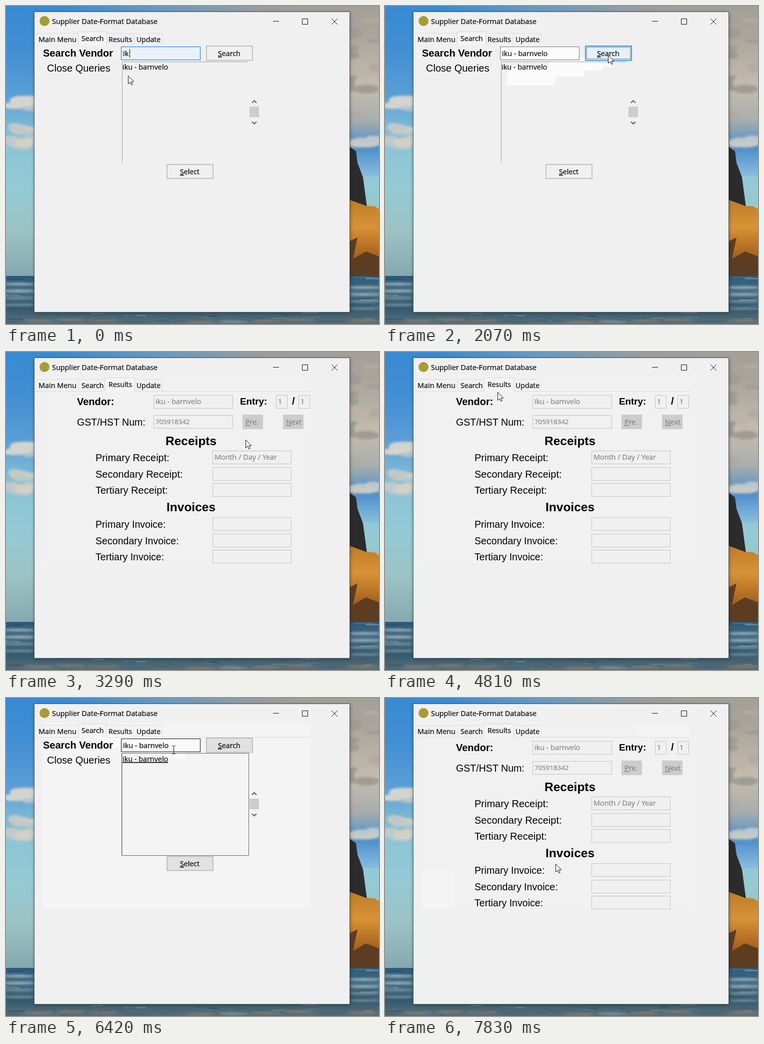
Recreate the animation shown at these times as an HTML page. Size 746 px wide and 635 px high, loop 8000 ms.

```html
<!DOCTYPE html>
<html lang="en">
<head>
<meta charset="utf-8">
<title>Supplier Date-Format Database</title>
<style>
  html, body { margin: 0; width: 100%; height: 100%; overflow: hidden; }
  svg { display: block; width: 746px; height: 635px; }
  text { white-space: pre; }
  .ui { font-family: "Open Sans", "Noto Sans", sans-serif; font-size: 14.4px; fill: #000; stroke: #000; stroke-width: .2px; }
  .dim { fill: #808080; stroke: #808080; }
  .chosen { fill: #fff; stroke: none; }
  .label { font-family: "Liberation Sans", Arial, sans-serif; font-size: 20px; fill: #000; }
  .bold { font-weight: bold; }
</style>
</head>
<body>
<svg id="stage" viewBox="0 0 746 635" xmlns="http://www.w3.org/2000/svg"></svg>
<script>
const LOOP = 8000;
const VENDOR = "iku - barnvelo";
const BLUE = "#0078d7";
const stage = document.getElementById("stage");

const rect = (x, y, w, h, fill, extra = "") =>
  `<rect x="${x}" y="${y}" width="${w}" height="${h}" fill="${fill}" ${extra}/>`;
// A crisp one pixel border, given by its outer edges.
const box = (x, y, right, bottom, fill, stroke, extra = "") =>
  rect(x + .5, y + .5, right - x - 1, bottom - y - 1, fill, `stroke="${stroke}" ${extra}`);
const path = (d, stroke, extra = "") => `<path d="${d}" fill="none" stroke="${stroke}" ${extra}/>`;
const text = (x, y, s, cls = "ui", extra = "") => `<text x="${x}" y="${y}" class="${cls}" ${extra}>${s}</text>`;
const sized = px => `style="font-size:${px}px"`;
const keyed = s => `<tspan text-decoration="underline">${s[0]}</tspan>${s.slice(1)}`;
const group = (id, content) => `<g id="${id}">${content}</g>`;
const poly = (points, fill) => `<polygon points="${points}" fill="${fill}"/>`;
const ellipse = (x, y, rx, ry, fill) => `<ellipse cx="${x}" cy="${y}" rx="${rx}" ry="${ry}" fill="${fill}"/>`;
const repeat = (count, make) => Array.from({ length: count }, (_, i) => make(i)).join("");

function makeRandom(seed) {
  return () => (seed = (seed * 16807) % 2147483647) / 2147483647;
}

function gradient(id, colors, across = false) {
  const stops = colors.map((color, i) => `<stop offset="${i / (colors.length - 1)}" stop-color="${color}"/>`);
  return `<linearGradient id="${id}" ${across ? "" : 'x2="0" y2="1"'}>${stops.join("")}</linearGradient>`;
}

function scenery() {
  const random = makeRandom(41);
  const pick = list => list[Math.floor(random() * list.length)];
  const clouds = (count, left, width, top, height, colors) => repeat(count, () =>
    ellipse(left + random() * width, top + random() * height, 10 + random() * 16, 4 + random() * 7, pick(colors)));
  const waves = repeat(110, () =>
    rect(random() * 746 - 15, 541 + random() * 92, 8 + random() * 34, 1 + random() * 2,
      pick(["#244d68", "#4b7890", "#2c5a78", "#8b9da4"]), 'opacity=".65"'));
  return `<defs>
      ${gradient("sky", ["#378ad3", "#438fd3", "#5c9fd6", "#8cc4d5", "#94cad5", "#9cc3c4", "#86a9b0"])}
      ${gradient("haze", ["#a5a097", "#aaa59b", "#b9b2a5", "#c1baad", "#a9aeae", "#4c8fca", "#8bbce0"])}
      ${gradient("top", ["#378ad3", "#6a9ac0", "#9c9e9c", "#a5a097"], true)}
      ${gradient("sea", ["#2b5979", "#476f86", "#31596f", "#5d6e75"])}
      ${gradient("cliff", ["#bf7d27", "#d99236", "#a9651f", "#5b3b1f"])}
      <filter id="soft" x="-50%" y="-50%" width="200%" height="200%"><feGaussianBlur stdDeviation="2"/></filter>
      <filter id="shade" x="-10%" y="-10%" width="120%" height="120%"><feGaussianBlur stdDeviation="3"/></filter>
    </defs>
    ${rect(0, 0, 746, 540, "url(#sky)")}
    ${rect(100, 0, 646, 12, "url(#top)")}
    ${rect(687, 0, 59, 340, "url(#haze)")}
    <g filter="url(#soft)">
      ${clouds(9, 0, 57, 184, 22, ["#c5ccd0", "#b0c3d0", "#d4d4cf"])}
      ${clouds(12, 0, 57, 238, 40, ["#d3d0c5", "#bccad0", "#c7c7c0"])}
      ${clouds(16, 687, 59, 10, 220, ["#a09c95", "#c2baab", "#b0aaa0"])}
      ${clouds(5, 700, 46, 262, 16, ["#b9c7cf", "#cacac5"])}
    </g>
    ${poly("687,281 700,290 703,313 714,342 722,402 687,405", "#2c2c2d")}
    ${poly("687,387 720,399 737,400 746,406 746,550 687,550", "url(#cliff)")}
    ${poly("687,470 703,462 694,505 720,490 746,500 746,550 687,550", "#5d3d22")}
    ${rect(0, 539, 746, 96, "url(#sea)")}
    ${waves}
    <g filter="url(#soft)">
      ${repeat(8, i => ellipse(i % 2 ? 718 : 26, 555 + i * 7, 32, 2, i < 4 ? "#b6c2c6" : "#8798a0"))}
      ${repeat(12, i => ellipse(i * 65, 626 + random() * 6, 30, 2, pick(["#8a7f70", "#40627a", "#8c989d"])))}
    </g>`;
}

function frame() {
  return rect(56, 13, 633, 600, "#000", 'opacity=".3" filter="url(#shade)"') +
    box(56, 11, 688, 612, "#f0f0f0", "#4c5358") +
    ellipse(77, 30, 10, 10, "#a79c36") +
    text(92, 36, "Supplier Date-Format Database") +
    path("M534 30.5h12M592.5 25.5h11v11h-11zM651 25l12 12m0-12l-12 12", "#111");
}

function tabs(active) {
  const names = ["Main Menu", "Search", "Results", "Update"];
  const starts = [65, 151, 205, 261];
  const [left, right] = active === 1 ? [144, 202] : [197, 258];
  const edges = starts.slice(1).map(x => x - 6).concat(312).filter(x => x < left - 2 || x > right + 2);
  return path("M59 54.5H312.5" + edges.map(x => `M${x + .5} 54v24`).join(""), "#dcdcdc") +
    rect(left, 51, right - left, 28, "#f4f4f4") +
    path(`M${left + .5} 78V51.5H${right - .5}V78`, "#d4d4d4") +
    names.map((name, i) => text(starts[i], i === active ? 70 : 72, name, "ui", sized(i ? 14.1 : 14.4))).join("");
}

// Areas that react to the pointer: x, y, width, height.
const AREAS = {
  field: [230, 81, 159, 27],
  searchButton: [401, 80, 92, 28.5],
  selectButton: [322, 316.5, 92, 28],
  vendor: [295, 86, 159, 27],
  number: [295, 126, 159, 28],
  tabHover: [146, 55, 51, 23]
};

function button(id, label, labelX) {
  const [x, y, w, h] = AREAS[id];
  return rect(x, y, w, h, "none", `id="${id}" stroke-width="1.5"`) +
    text(labelX, Math.floor(y) + 20, keyed(label), "ui", sized(14.2));
}

function searchView() {
  return group("panel", rect(74, 50, 535, 371, "#f4f4f4")) +
    group("trails", "") +
    group("openList", path("M232.5 313V111.5H483", "#a0a0a0")) +
    group("fullList", path("M58 78.5H609", "#d9d9d9") +
      box(231, 110, 486, 315, "none", "#696969") + path("M232.5 313V112", "#b5b5b5")) +
    tabs(1) +
    text(74, 101, "Search Vendor", "label bold") +
    text(82, 131, "Close Queries", "label") +
    box(230, 81, 389, 108, "#fcfcfc", "#7a7a7a", 'id="field"') +
    text(234, 100, "", "ui", 'id="query"') +
    rect(247, 86, 1, 17, "#000", 'id="caret"') +
    button("searchButton", "Search", 424) +
    box(403, 82, 491, 106, "none", "#222", 'id="focus" stroke-dasharray="1 1"') +
    group("selection", rect(233, 112, 251, 28, "#fbfbfb") + rect(233, 113, 251, 19, BLUE)) +
    text(233, 127, VENDOR, "ui", 'id="item"') +
    rect(487, 201, 19, 21, "#cdcdcd") +
    path("M492 193.5l4.5-4.5 4.5 4.5M492 231l4.5 4.5 4.5-4.5", "#606060", 'stroke-width="2"') +
    button("selectButton", "Select", 348);
}

function resultsView() {
  const input = (x, y, w, value = "", px = 14.4) =>
    box(x, y, x + w, y + 27, "#f0f0f0", "#c3c3c3") + text(x + 4, y + 18, value, "ui dim", sized(px));
  const disabled = (x, label) =>
    rect(x, 125, 41, 29, "#cccccc") + text(x + 6, 145, keyed(label), "ui dim");
  const rows = (kind, top, px, first) => ["Primary", "Secondary", "Tertiary"].map((rank, i) => {
    const y = Math.round(top + i * 32.5);
    return text(179, y + 21, `${rank} ${kind}:`, "label", sized(px)) + input(413, y, 158, i ? "" : first);
  }).join("");
  return rect(74, 50, 535, 371, "#f1f1f1") +
    group("patches", rect(506, 51, 103, 27, "#f4f4f4") + rect(74, 345, 66, 76, "#f4f4f4")) +
    path("M58 78.5H609", "#dcdcdc") +
    rect(...AREAS.tabHover, "#d8eaf9", 'id="tabHover"') + tabs(2) +
    text(142, 106, "Vendor:", "label bold") + input(295, 86, 159, VENDOR) +
    text(468, 105, "Entry:", "label bold", sized(18.8)) +
    input(540, 86, 23, "1") + text(572, 105, "/", "label bold") + input(585, 86, 23, "1") +
    text(142, 147, "GST/HST Num:", "label", sized(19.6)) + input(295, 126, 159, "705918342", 13.3) +
    disabled(473, "Pre.") + disabled(554, "Next") +
    text(319, 186, "Receipts", "label bold", sized(24.5)) + rows("Receipt", 197, 20, "Month / Day / Year") +
    text(321, 318, "Invoices", "label bold", sized(24.5)) + rows("Invoice", 330, 19.6, "");
}

const pointers =
  group("arrow", `<path d="M.5 .5V16.5L4.2 13L6.8 18.6L9.2 17.5L6.7 12.1H11.8Z" fill="#fff" stroke="#111"/>`) +
  group("beam", path("M-3 -7.5h2.5l1 1 1-1H4M.5 -6.5v15M-3 8.5h2.5l1-1 1 1H4", "#111"));

stage.innerHTML = scenery() + frame() +
  group("search", searchView()) + group("results", resultsView()) + pointers;

const el = id => document.getElementById(id);
const show = (id, on) => el(id).setAttribute("visibility", on ? "inherit" : "hidden");
const set = (id, attrs) => { for (const k in attrs) el(id).setAttribute(k, attrs[k]); };

// Each glide of the pointer: start time, number of screen updates, destination.
const STEP = 122;
const GLIDES = [
  [1580, 5, 446, 98], [2900, 4, 479, 175], [3870, 3, 373, 131], [4570, 4, 191, 68], [5090, 3, 182, 68],
  [5480, 6, 346, 99], [6420, 1, 335, 103], [6570, 2, 303, 121], [7120, 1, 319, 284], [7280, 3, 341, 331]
];

function pointerHops() {
  let from = { time: 0, x: 244, y: 139 };
  const hops = [from];
  for (const [start, count, x, y] of GLIDES) {
    for (let i = 1; i <= count; i++) {
      const eased = 1 - (1 - i / count) ** 2.4;
      hops.push({
        time: start + (i - 1) * STEP,
        x: Math.round(from.x + (x - from.x) * eased),
        y: Math.round(from.y + (y - from.y) * eased)
      });
    }
    from = hops.at(-1);
  }
  return hops;
}

const hops = pointerHops();

// Every hop leaves a lighter area that spans the old and the new pointer.
function trail(hop, i) {
  const last = hops[i - 1];
  const x = Math.min(hop.x, last.x), y = Math.min(hop.y, last.y);
  return rect(x, y, Math.abs(hop.x - last.x) + 12, Math.abs(hop.y - last.y) + 19, "#fbfbfb");
}

function draw(t) {
  const during = (from, to) => t >= from && t < to;
  const later = t >= 5090;
  const onResults = during(2440, 5090) || t >= 7700;
  const typing = t < 1010;
  const selected = during(6850, 7700);
  const viewStart = later ? 5090 : 0;

  const pointer = hops.findLast(hop => hop.time <= t);
  const over = id => {
    const [x, y, w, h] = AREAS[id];
    return pointer.x >= x && pointer.x < x + w && pointer.y >= y && pointer.y < y + h;
  };
  const onText = onResults ? over("vendor") || over("number") : over("field");

  show("search", !onResults);
  show("results", onResults);
  show("patches", t >= 7700);
  show("tabHover", over("tabHover"));
  show("panel", later);
  show("openList", !later);
  show("fullList", later);
  show("caret", typing && !during(150, 450));
  show("focus", during(1010, 2440));
  show("selection", selected);
  if (!onResults) show("tabHover", false);

  el("query").textContent = typing ? VENDOR.slice(0, 2) : VENDOR;
  set("field", {
    fill: typing ? "#e9f1fa" : later ? "#f9f9f9" : "#fcfcfc",
    stroke: typing ? BLUE : over("field") ? "#111" : "#7a7a7a"
  });
  set("item", { class: selected ? "ui chosen" : "ui", "text-decoration": later ? "underline" : "none" });
  for (const id of ["searchButton", "selectButton"]) {
    const hovered = over(id);
    set(id, { fill: hovered ? "#e5f1fb" : later ? "#e1e1e1" : "#f0f0f0", stroke: hovered ? BLUE : "#b2b2b2" });
  }
  el("trails").innerHTML = hops.map((hop, i) =>
    i && hop.time > viewStart && hop.time <= t ? trail(hop, i) : "").join("");

  show("arrow", !onText);
  show("beam", onText);
  set(onText ? "beam" : "arrow", { transform: `translate(${pointer.x} ${pointer.y})` });
}

const start = performance.now();
function tick() {
  draw((performance.now() - start) % LOOP);
  requestAnimationFrame(tick);
}
tick();
</script>
</body>
</html>
```
